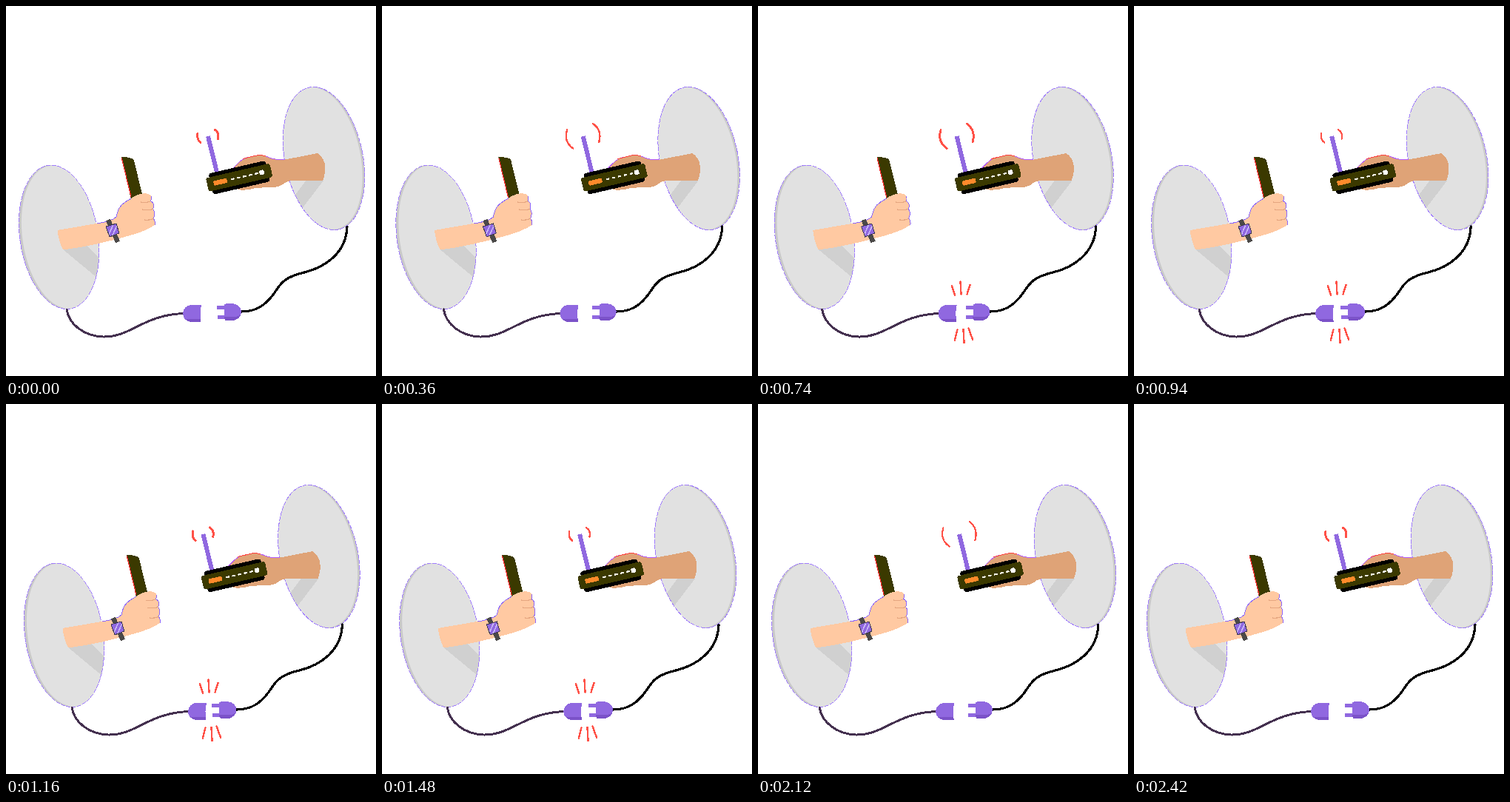
Write an HTML page that moves like this. It is 500 by 500 pixels and loops after 2440 ms.

```html
<!DOCTYPE html>
<html lang="en">
<head>
<meta charset="utf-8">
<title>Connecting</title>
<style>
html, body { margin: 0; width: 100%; height: 100%; overflow: hidden; background: #fff; }
svg { display: block; width: 100%; height: 100%; shape-rendering: crispEdges; }
.line { fill: none; stroke-linecap: round; }
.fringe { fill: none; stroke: #a07cff; stroke-width: 1; stroke-dasharray: 6 1.5; }
.rim { fill: #c9c9c9; }
.face { fill: #e1e1e1; }
.shade { fill: #d0d0d0; }
.violet { fill: #9068e0; }
.deep { fill: #7b52c8; }
.olive { fill: #3b3900; }
.red { stroke: #ff5147; }
</style>
</head>
<body>
<svg viewBox="0 0 500 500">
  <defs>
    <clipPath id="leftFace"><ellipse cx="73.4" cy="312.2" rx="51" ry="97.4" transform="rotate(-8.7 73.4 312.2)"/></clipPath>
    <clipPath id="rightFace"><ellipse cx="427.8" cy="205.8" rx="51.3" ry="97.4" transform="rotate(-11.6 427.8 205.8)"/></clipPath>
    <clipPath id="screen"><path d="M135 298L149 294L153 307L140 312Z"/></clipPath>
  </defs>

  <g id="left">
    <ellipse class="rim" cx="71.6" cy="312.3" rx="52.7" ry="98" transform="rotate(-8.7 71.6 312.3)"/>
    <g clip-path="url(#leftFace)">
      <path class="face" d="M0 200H140V420H0Z"/>
      <path class="shade" d="M77 329L127 370.5V342L107 322Z"/>
    </g>
    <ellipse class="fringe" cx="71.6" cy="312.3" rx="52.7" ry="98" transform="rotate(-8.7 71.6 312.3)"/>
    <path class="line" stroke="#44304f" stroke-width="3" d="M82 410C85 430 105 446 131 447C169 448 185 417 241 415.5"/>
    <path class="violet" d="M264 403.5H251C243 404.5 239 410 239 415.5C239 421.5 243 426.5 251 427H263.5L262.5 415Z"/>
    <path class="deep" d="M243 423.5Q246.500 427 251 427H263.5L263.2 422.5H250Z"/>
    <path class="olive" d="M156 204.5L159 203.5L170.5 206Q172.5 207 173 209L184 254L169 261Z"/>
    <path class="line" stroke="#ff2d2d" stroke-width="1.2" d="M156.5 206L169 258"/>
    <path fill="#ffc9a2" d="M69.5 303L122 294Q143 291 149 285C151 276 153 270 161 265C169 260 176 254 186 253.3Q195 253 196.5 258Q197 261 195.5 263.5Q200.5 266 199.5 271.5L198.5 274Q202 279 200 285L199 287Q202.5 291 201 296C193 301.5 181 306.5 165 310.8C137 318.5 107 326 77 329.5Q71 317 69.5 303Z"/>
    <path class="line" stroke="#8c66ff" stroke-width="1" d="M123 294Q143 291 149 285C151 276 153 270 161 265L169 260M196 257Q197 261 195.5 263.5Q200.5 266 199.5 271.5L198.5 274Q202 279 200 285L199 287Q202.5 291 201 296"/>
    <path class="line" stroke="#e5a680" stroke-width="1.2" d="M182 265Q188 267 195 264M184 275Q191 277 198 274.5M187 289Q193 290 199 287.5"/>
    <path fill="none" stroke="#4b4948" stroke-width="6.5" d="M138 289L151 319"/>
    <path class="violet" d="M135 298L149 294L153 307L140 312Z"/>
    <path clip-path="url(#screen)" stroke="#c9b8f6" stroke-width="1.6" d="M138 311L146 293M143 312L151 294"/>
    <path fill="none" stroke="#3e3851" stroke-width="1" d="M135 298L149 294L153 307L140 312Z"/>
  </g>

  <g id="right">
    <ellipse class="rim" cx="429.5" cy="206" rx="52.7" ry="98" transform="rotate(-11.6 429.5 206)"/>
    <g clip-path="url(#rightFace)">
      <path class="face" d="M360 100H490V310H360Z"/>
      <path class="shade" d="M406 235L387 260.5L399.5 274.5L429 236Z"/>
    </g>
    <ellipse class="fringe" cx="429.5" cy="206" rx="52.7" ry="98" transform="rotate(-11.6 429.5 206)"/>
    <path class="line" stroke="#000" stroke-width="3.2" d="M461 298C460 333 432 353 403 360C364 369 371 384 351 401C341 410 331 413 317 413"/>
    <path class="violet" d="M295 403.5Q297 402 300 402H306C314 403 318 408 318 413C318 420 313 424.5 306 425H296.5L295 422.5H285.5V418H295V409.5H285V405H295Z"/>
    <path class="deep" d="M317 417C315 422 311 425 306 425H296.5L295 422.5L294.5 420H308Q314 420 317 417Z"/>
    <path fill="#dfa377" d="M305 221L313 213Q321 205 328 204.5L343 201L353 203.5Q362 208.5 377 207.5L421 199Q428 204 430.5 212Q433 224 428 236H386Q378 237 374 241Q367 246 354 245L337 246Q325 250 313 248Z"/>
    <path class="line" stroke="#b35cff" stroke-width="1" d="M306 220L313 213Q321 205 328 204.5L343 201L353 203.5Q362 208.5 376 207.5"/>
    <path class="line" stroke="#ff4040" stroke-width="1" d="M320 206.5L328 204.5L343 201L351 203"/>
    <path stroke="#9068e0" stroke-width="6" d="M273 176L285 225"/>
    <g transform="translate(315.2 231.8) rotate(-13)">
      <rect x="-39.5" y="-14.5" width="79" height="29" rx="4"/>
      <rect class="olive" x="-44.3" y="-9.4" width="88.6" height="18.8" rx="3"/>
      <rect x="-35.5" y="-3.2" width="18.5" height="6.4" rx="1.5" fill="#ff8a2b"/>
      <path stroke="#f1f0e5" stroke-width="2.3" stroke-linecap="round" stroke-dasharray="2.8 5.4" d="M-10.5 0H26"/>
      <rect x="28" y="-3.2" width="6.4" height="6.4" rx="2" fill="#fff"/>
    </g>
    <path id="near" class="line red" d="M259 172Q257.5 181 263 184.5M282 167Q288.500 171 286.5 179.5"/>
    <path id="far" class="line red" d="M251.5 167.5Q246.5 183 259.5 192.5M286.5 159Q299 168 294.5 184"/>
  </g>

  <path id="sparks" class="line red" d="M262 378L266 390.5M273.5 372.5L274.5 389.5M286.5 377L282.5 389.5M269.5 437.5L266 451.5M277.5 437L278.5 455M284.5 435.5L290 450.5"/>
</svg>
<script>
const LOOP = 2440, STEP = 20, TAU = Math.PI * 2;
const el = id => document.getElementById(id);
const [left, right, near, far, sparks] = ['left', 'right', 'near', 'far', 'sparks'].map(el);

// Strokes switch on at half strength, then thicken.
function glow(node, level) {
  node.setAttribute('visibility', level > .5 ? 'visible' : 'hidden');
  node.setAttribute('stroke-width', Math.min(3, 1 + 2.2 * level).toFixed(2));
}

function draw(t) {
  const shift = 3.5 * (1 - Math.cos(TAU * t / LOOP));
  left.setAttribute('transform', `translate(${shift.toFixed(3)} 0)`);
  right.setAttribute('transform', `translate(${(-shift * .95).toFixed(3)} 0)`);

  const pulse = (1 - Math.cos(TAU * t / (LOOP / 2))) / 2;
  glow(near, 1 - pulse);
  glow(far, pulse);

  const edge = Math.min(t - 610, 1695 - t);
  glow(sparks, Math.min(.65, .5 + edge / 500));
}

const start = performance.now();
function tick() {
  const t = (performance.now() - start) % LOOP;
  draw(Math.floor(t / STEP) * STEP);
  requestAnimationFrame(tick);
}
draw(0);
requestAnimationFrame(tick);
</script>
</body>
</html>
```
